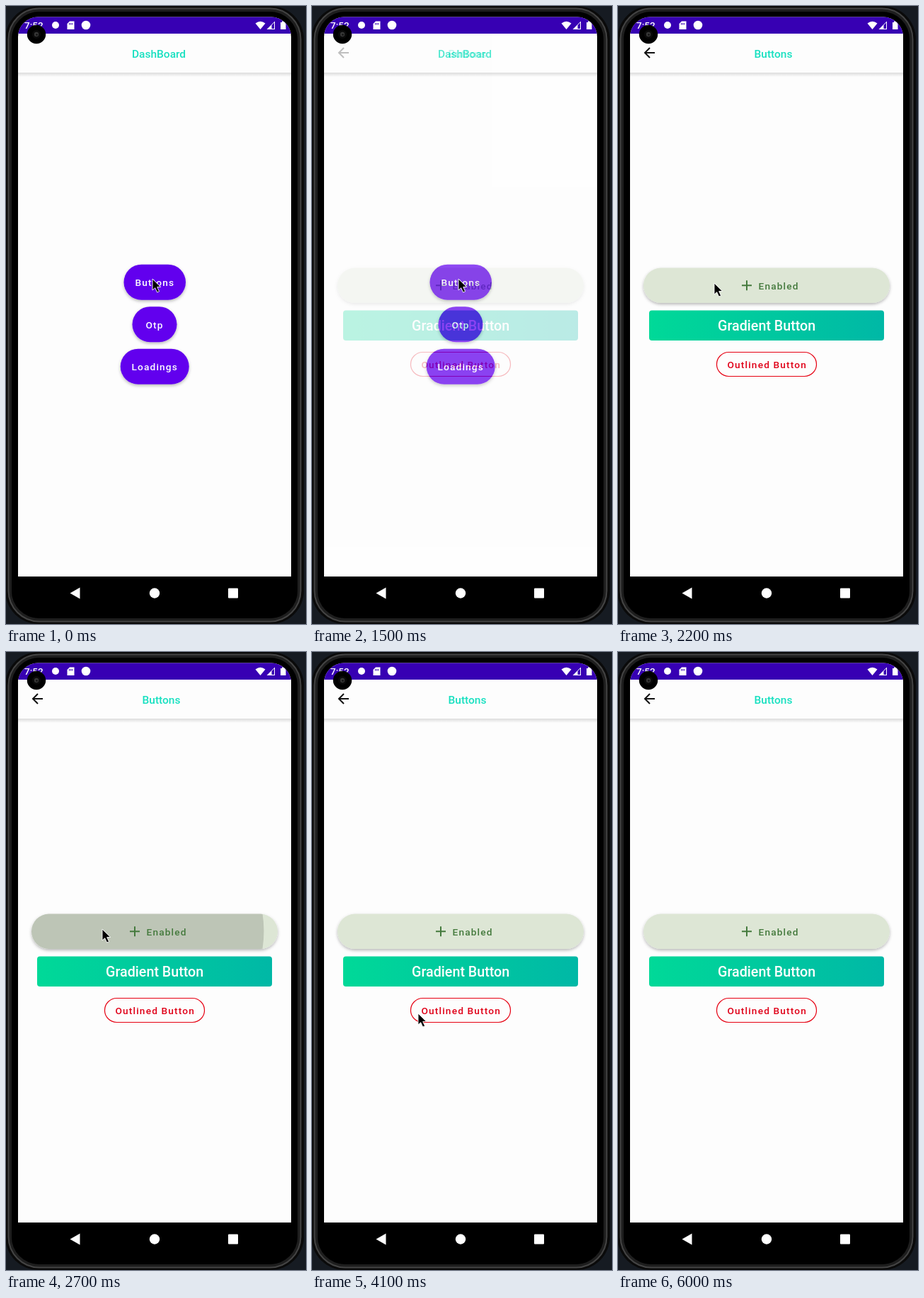
An HTML page that plays this animation: 424x872 px, repeating every 6100 ms.

```html
<!DOCTYPE html>
<html lang="en">
<head>
<meta charset="utf-8">
<title>Button demo</title>
<style>
  html, body { margin: 0; width: 100%; height: 100%; overflow: hidden; background: #161b22; }
  svg { display: block; width: 100vw; height: 100vh; font-family: Roboto, sans-serif; }
  .title { font-size: 15.5px; font-weight: 500; fill: #16e0c0; text-anchor: middle; }
  .label { font-size: 13.7px; font-weight: 500; letter-spacing: 1.15px; }
</style>
</head>
<body>
<svg viewBox="0 0 424 872">
  <defs>
    <linearGradient id="teal"><stop stop-color="#00d998"/><stop offset="1" stop-color="#00b8a6"/></linearGradient>
    <linearGradient id="barShade" x2="0" y2="1"><stop stop-color="#000" stop-opacity=".13"/><stop offset="1" stop-color="#000" stop-opacity="0"/></linearGradient>
    <filter id="drop" x="-20%" y="-30%" width="140%" height="180%"><feDropShadow dx="0" dy="2" stdDeviation="2" flood-opacity=".28"/></filter>
    <clipPath id="glass"><path d="M17 805V43.500a28 28 0 0 1 28-28H375a28 28 0 0 1 28 28V805z"/></clipPath>
    <clipPath id="dashClip"><rect x="166.500" y="364.700" width="87.500" height="50" rx="25"/></clipPath>
    <clipPath id="enabledClip"><rect x="36" y="369.500" width="348" height="49.500" rx="24.700"/></clipPath>
    <clipPath id="gradientClip"><rect x="44" y="429.500" width="332" height="42.500" rx="4"/></clipPath>
    <clipPath id="outlinedClip"><rect x="139" y="488" width="142" height="35" rx="17.500"/></clipPath>
  </defs>

  <!-- phone body -->
  <rect x="-1" y="0" width="422" height="872" rx="47" fill="#0a0a0a"/>
  <g fill="none">
    <rect x="6" y="6" width="408" height="860" rx="41" stroke="#1e1e1e" stroke-width="4"/>
    <rect x="3.500" y="3.500" width="413" height="865" rx="43.500" stroke="#444" stroke-width="2"/>
  </g>
  <rect x="8" y="8" width="404" height="856" rx="39" fill="#000"/>

  <g clip-path="url(#glass)">
    <rect x="17" y="15" width="386" height="790" fill="#fdfdfd"/>
    <rect x="17" y="15" width="386" height="24" fill="#3700b3"/>
    <g fill="#fff">
      <text x="26" y="32" font-size="13.500" font-weight="500">7:52</text>
      <circle cx="70" cy="27" r="5"/>
      <path d="M90 21.500h6.500v11.500h-10v-8z"/>
      <path d="M89.500 24v2.500m2-2.500v2.500m2-2.500v2.500" stroke="#3700b3"/>
      <circle cx="113" cy="27" r="6.300"/>
      <path d="M352.500 24.500q7-5.500 14 0l-7 8.500z"/>
      <path d="M380 21.500v11.500h-11.500z"/>
      <path d="M375.500 27v5h3.500v-8.500z" fill="#3700b3"/>
      <path d="M388 23h2v-1.500h3l2.500 4v7.500h-7.500z"/>
    </g>

    <g id="dash">
      <text class="title" x="216" y="73">DashBoard</text>
      <g fill="#6200ee" filter="url(#drop)">
        <rect x="166.500" y="364.700" width="87.500" height="50" rx="25"/>
        <rect x="178.500" y="424.200" width="63" height="50" rx="25"/>
        <rect x="161.700" y="483.700" width="97" height="50" rx="25"/>
      </g>
      <circle id="dashRipple" clip-path="url(#dashClip)"/>
      <g class="label" fill="#fff">
        <text x="182.500" y="395">Buttons</text>
        <text x="197.500" y="454.500">Otp</text>
        <text x="177.500" y="514">Loadings</text>
      </g>
    </g>

    <!-- opaque page that dissolves in over the dashboard -->
    <g id="buttons">
      <rect x="17" y="39" width="386" height="766" fill="#fdfdfd"/>
      <path d="M52 66H38m7-7l-7 7 7 7" fill="none" stroke="#111" stroke-width="2"/>
      <text class="title" x="219.500" y="73">Buttons</text>
      <rect x="36" y="369.500" width="348" height="49.500" rx="24.700" fill="#dde6d5" filter="url(#drop)"/>
      <circle id="enabledRipple" clip-path="url(#enabledClip)"/>
      <path d="M175 394.300h14m-7-7v14" stroke="#447a3d" stroke-width="2"/>
      <text class="label" x="198.500" y="399.500" fill="#447a3d">Enabled</text>
      <rect x="44" y="429.500" width="332" height="42.500" rx="4" fill="url(#teal)"/>
      <circle id="gradientRipple" clip-path="url(#gradientClip)"/>
      <text x="141" y="458" font-size="19.700" font-weight="500" fill="#fff">Gradient Button</text>
      <circle id="outlinedRipple" clip-path="url(#outlinedClip)"/>
      <rect x="139.500" y="488.500" width="141" height="34" rx="17" fill="none" stroke="#e60012" stroke-width="1.200"/>
      <text class="label" x="154.500" y="511" fill="#e00018">Outlined Button</text>
    </g>

    <rect x="17" y="94" width="386" height="6" fill="url(#barShade)"/>
  </g>

  <!-- camera and navigation -->
  <circle cx="43" cy="40" r="13.200" fill="#000"/>
  <circle cx="43" cy="40" r="6" fill="#0a0a0a"/>
  <circle cx="43" cy="40" r="3.200" fill="#363636"/>
  <circle cx="43.500" cy="40.500" r="1.300" fill="#111"/>
  <g fill="#fff">
    <path d="M90.500 828.500l14-8v16z"/>
    <circle cx="210" cy="828.500" r="7.200"/>
    <rect x="314" y="821.500" width="14" height="14" rx="1"/>
  </g>

  <path id="pointer" d="M0 0v16l3.700-3.300 2.900 6.300 3-1.300-2.900-6.200h5z" fill="#000" stroke="#fff" stroke-width=".9"/>
</svg>
<script>
const LOOP = 6100, STEP = 100;
const $ = id => document.getElementById(id);

// rows of [time, ...values]
const pointerPath = [
  [0, 207, 385], [1500, 207, 385], [1700, 187, 367], [2200, 136, 391], [3000, 136, 391],
  [3400, 139, 441], [3600, 139, 441], [4100, 150, 510], [5000, 150, 510], [5600, -14, -24]
];
const fade = [[1300, 0], [1400, .05], [1500, .26], [1600, .7], [1700, .94], [1800, 1]];

const ripples = [
  { id: 'dash', start: 1150, from: [210, 388], to: [210.5, 390], r: [26, 52], color: '#fff', alpha: .24 },
  { id: 'enabled', start: 2530, from: [138, 393], to: [210, 394], r: [104, 184], color: '#000', alpha: .145 },
  { id: 'gradient', start: 3430, from: [140, 442], to: [210, 451], r: [100, 178], color: '#000', alpha: .12 },
  { id: 'outlined', start: 4330, from: [151, 511], to: [210, 506], r: [43, 83], color: '#e00018', alpha: .12 }
];

const clamp = v => Math.max(0, Math.min(1, v));
const mix = (a, b, k) => a + (b - a) * k;

function track(rows, t) {
  const next = rows.findIndex(row => row[0] > t);
  if (next < 0) return rows[rows.length - 1].slice(1);
  if (next === 0) return rows[0].slice(1);
  const a = rows[next - 1], b = rows[next];
  const k = (t - a[0]) / (b[0] - a[0]);
  return a.slice(1).map((v, i) => mix(v, b[i + 1], k));
}

function drawRipple({ id, start, from, to, r, color, alpha }, t) {
  const age = t - start, el = $(id + 'Ripple');
  const grow = clamp(age / 225);
  const drift = 1 - (1 - grow) ** 1.4;
  const shown = clamp(age / 75) * (1 - clamp((age - 225) / 150));
  el.setAttribute('cx', mix(from[0], to[0], drift));
  el.setAttribute('cy', mix(from[1], to[1], drift));
  el.setAttribute('r', mix(r[0], r[1], grow));
  el.setAttribute('fill', color);
  el.setAttribute('opacity', alpha * shown);
}

function draw(time) {
  const t = Math.floor((time % LOOP) / STEP) * STEP;
  const [enter] = track(fade, t);
  $('buttons').setAttribute('opacity', enter);
  ripples.forEach(ripple => drawRipple(ripple, t));
  const [x, y] = track(pointerPath, t);
  $('pointer').setAttribute('transform', `translate(${x} ${y})`);
}

const began = performance.now();
function tick() {
  draw(performance.now() - began);
  requestAnimationFrame(tick);
}
tick();
</script>
</body>
</html>
```
